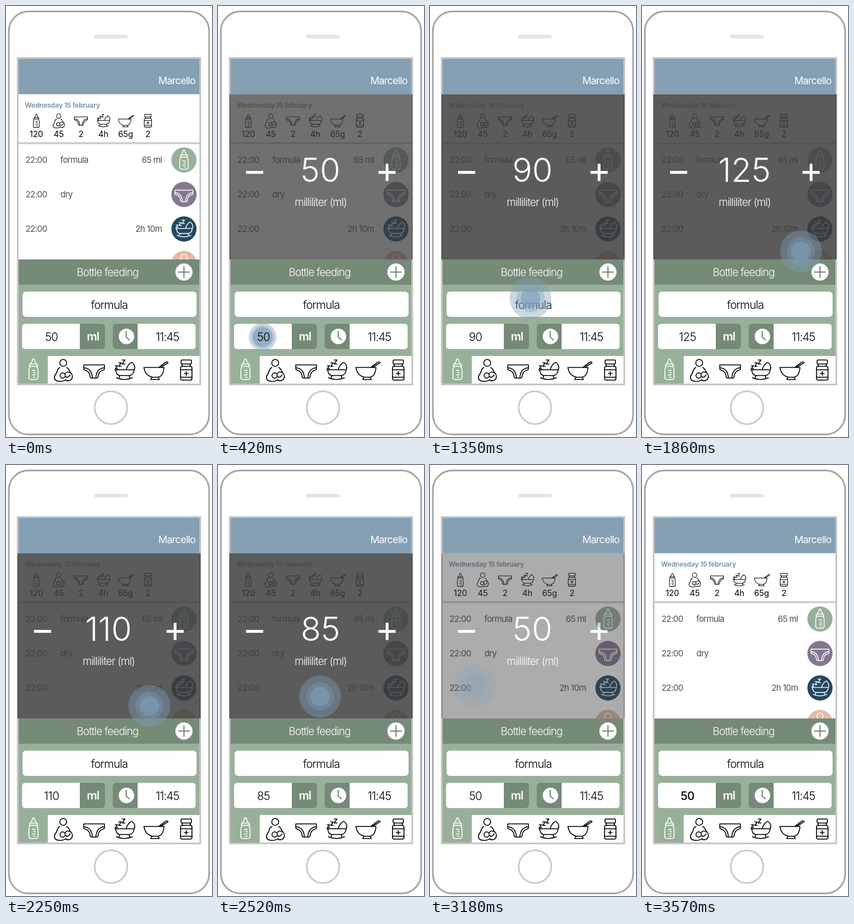
Write an HTML page that moves like this. It is 360 px wide and 750 px high and loops after 4500 ms.

```html
<!DOCTYPE html>
<html lang="en">
<head>
<meta charset="utf-8">
<title>Feeding amount slider</title>
<style>
  html, body { margin: 0; width: 100%; height: 100%; overflow: hidden; background: #fff; }
  svg { display: block; width: 100%; height: 100%; }
  text { font-family: Inter, Roboto, "Open Sans", sans-serif; font-weight: 350; letter-spacing: -.045em; }
  .icon { fill: none; stroke-width: 1.6; stroke-linecap: round; stroke-linejoin: round; }
  .mid { text-anchor: middle; }
  .end { text-anchor: end; }
  .white { fill: #fff; }
  .row { font-size: 14.8px; fill: #505050; font-weight: 400; }
  .sum { font-size: 14.5px; font-weight: 400; letter-spacing: -.01em; }
  .field { font-size: 20px; }
  .number { letter-spacing: -.03em; }
  .dark { fill: #768a78; }
</style>
</head>
<body>
<svg viewBox="0 0 360 750">
  <defs>
    <g id="bottle">
      <path d="M-5-9C-5-12-2-12-2-15Q-2-18 0-18T2-15C2-12 5-12 5-9"/>
      <rect x="-7" y="-9" width="14" height="4" rx="2"/>
      <path d="M-6-5C-8-2-8 0-8 3V14Q-8 18-4 18H4Q8 18 8 14V3C8 0 8-2 6-5M-2 2H3M0 6H3M-2 10H3M0 14H3"/>
    </g>
    <g id="mother">
      <circle cy="-13" r="6"/>
      <path d="M-6-5Q-10-3-11 3L-15 10Q-17 18-8 19Q0 20 5 16M6-5Q10-3 12 3Q18 8 15 15Q11 20 4 17"/>
      <circle cx="-1" cy="9" r="4.6"/>
      <path d="M3 6Q8 0 13 5M4 11Q8 14 12 8"/>
    </g>
    <g id="diaper">
      <path d="M-18-11H18V-5Q18-2 16-2Q8 0 7 9Q7 12 4 12H-4Q-7 12-7 9Q-8 0-16-2Q-18-2-18-5Z"/>
      <path d="M-18-6Q-4-5-3 12M18-6Q4-5 3 12"/>
    </g>
    <g id="crib">
      <path d="M-16-8H-12L-16-3H-12M-10-13H-5.500L-10-7H-5.500M-4-18H1L-4-11H1"/>
      <path d="M-17-1H17M-15-1Q-15 8-8 9H9Q16 8 17-1M3-1C5-8 8-12 13-14C18-10 19-5 17-1M-8 9L-10 14M8 9L10 14M-14 13Q0 19 14 13"/>
    </g>
    <g id="bowl">
      <path d="M-20-5H15Q14 11 4 12H-5Q-18 9-20-5ZM-6 12L-8 16H7L5 12M6-5L18-14Q22-16 22-13L9-5"/>
    </g>
    <g id="jar">
      <rect x="-9" y="-18" width="18" height="7" rx="1.5"/>
      <path d="M-7-11V-7M7-11V-7M-10-1H10M-10 12H10M0 2V9M-3.500 5.500H3.500"/>
      <rect x="-10" y="-7" width="20" height="24" rx="3"/>
    </g>
    <linearGradient id="shade" x2="0" y2="1">
      <stop stop-color="#aaa"/><stop offset="1" stop-color="#fff"/>
    </linearGradient>
  </defs>

  <rect width="360" height="750" fill="#fff"/>
  <rect x="5" y="9.500" width="350" height="736" rx="34" fill="#fff" stroke="#a6a6a6" stroke-width="3"/>
  <rect x="154" y="50" width="59" height="6.500" rx="3.200" fill="#e5e5e5"/>
  <circle cx="183.500" cy="699" r="28.500" fill="#fff" stroke="#ccc" stroke-width="3"/>
  <rect x="20.500" y="90.500" width="319" height="568" fill="#fff" stroke="#c6c6c6" stroke-width="3"/>

  <rect x="22" y="92" width="316" height="61.500" fill="#859fb3"/>
  <text class="white end" x="331" y="136" font-size="17.5" style="font-weight:400">Marcello</text>
  <text x="33" y="177" font-size="11.7" fill="#7f9bb1" style="font-weight:700;letter-spacing:-.015em">Wednesday 15 february</text>
  <rect x="22" y="237.500" width="316" height="4" fill="url(#shade)"/>
  <g id="summary"></g>
  <g id="rows"></g>

  <rect x="22" y="441" width="316" height="44" class="dark"/>
  <rect x="22" y="485" width="316" height="124" fill="#98b099"/>
  <rect x="22" y="609" width="316" height="48" fill="#fff"/>
  <rect x="22" y="608" width="51" height="49" fill="#98b099"/>
  <text class="white mid" x="177.500" y="470" font-size="18.6">Bottle feeding</text>
  <circle cx="311" cy="463" r="15" fill="#fff"/>
  <path d="M301 463H321M311 453V473" stroke="#768a78" stroke-width="2"/>
  <rect x="29" y="497" width="304" height="44" rx="6" fill="#fff"/>
  <text class="field mid" x="180.500" y="526.500">formula</text>

  <rect x="28" y="553" width="145" height="44" rx="6" class="dark"/>
  <path d="M129 553H34Q28 553 28 559V591Q28 597 34 597H129Z" fill="#fff"/>
  <text class="field white mid" x="152" y="582" style="font-weight:600">ml</text>

  <rect x="186.500" y="553" width="145" height="44" rx="6" class="dark"/>
  <path d="M230 553H325.500Q331.500 553 331.500 559V591Q331.500 597 325.500 597H230Z" fill="#fff"/>
  <circle cx="210.500" cy="575" r="13.500" fill="#fff"/>
  <path d="M210 565.500V576L216 581.500" fill="none" stroke="#768a78" stroke-width="2"/>
  <text class="field mid" x="282" y="583">11:45</text>
  <g id="tabs"></g>

  <g id="dialog">
    <rect x="20" y="153.500" width="320" height="287.500" fill="#3c3c3c" fill-opacity=".84"/>
    <path d="M49 289.500H79M280.500 289.500H310.500M295.500 274.500V304.500" stroke="#fff" stroke-width="5"/>
    <text id="big" class="white mid" x="179" y="306" font-size="58" style="font-weight:300;letter-spacing:0">50</text>
    <text class="white mid" x="179.500" y="348" font-size="18.5">milliliter (ml)</text>
  </g>
  <g id="touch" fill="#7d9fb9">
    <circle opacity=".4"/><circle opacity=".35"/><circle opacity=".6"/>
  </g>
  <text id="amount" class="field number mid" x="79.500" y="583">50</text>
</svg>
<script>
const LOOP = 4500, STEP = 30;
const $ = id => document.getElementById(id);
const kinds = ['bottle', 'mother', 'diaper', 'crib', 'bowl', 'jar'];

const icon = (kind, x, y, size, color) =>
  `<use href="#${kind}" class="icon" stroke="${color}" transform="translate(${x} ${y}) scale(${size})"/>`;
const label = (text, x, y, cls) => `<text class="${cls}" x="${x}" y="${y}">${text}</text>`;

const totals = ['120', '45', '2', '4h', '65g', '2'];
$('summary').innerHTML = kinds.map((kind, i) => {
  const x = 53 + 39 * i;
  return icon(kind, x, 200, .64, '#000') + label(totals[i], x, 228, 'sum mid');
}).join('');

const entries = [
  ['bottle', '#98b099', 'formula', '65 ml', 267.5, .92],
  ['diaper', '#84778f', 'dry', '', 330, .87],
  ['crib', '#234860', '', '2h 10m', 388, .86],
  ['mother', '#e3baa5', '', '', 449, .9]
];
$('rows').innerHTML = entries.map(([kind, color, name, amount, iconY, size], i) => {
  const y = 268 + 60 * i;
  const texts = i < 3
    ? label('22:00', 34, y + 5, 'row') + label(name, 95, y + 5, 'row') + label(amount, 272.5, y + 5, 'row end')
    : '';
  return texts + `<circle cx="311" cy="${y}" r="22" fill="${color}"/>` + icon(kind, 311, iconY, size, '#fff');
}).join('');

const tabX = [48, 100, 154, 207, 261, 315];
$('tabs').innerHTML = kinds.map((kind, i) =>
  icon(kind, tabX[i], i === 2 ? 635.5 : i ? 634 : 632, 1, i ? '#000' : '#fff')).join('');

const ramp = (t, from, to) => Math.min(1, Math.max(0, (t - from) / (to - from)));

// Ease with flat ends; a and b are the horizontal handle positions.
function ease(x, a, b) {
  let lo = 0, hi = 1;
  for (let i = 0; i < 24; i++) {
    const s = (lo + hi) / 2, r = 1 - s;
    if (3 * r * r * s * a + 3 * r * s * s * b + s * s * s < x) lo = s; else hi = s;
  }
  return x <= 0 ? 0 : x >= 1 ? 1 : lo * lo * (3 - 2 * lo);
}

const rings = $('touch').children;

function draw(t) {
  const out = ease(ramp(t, 870, 1920), .33, .58);
  const back = ease(ramp(t, 1920, 2970), .52, .67);
  const x = 78 + 201 * (out - back);
  const y = 576 - 150 * out + 20 * out * (1 - out) - 42 * back - 8 * back * (1 - back);
  const value = 50 + 5 * (Math.ceil(15 * out) - Math.ceil(15 * back));
  const leave = 1 - ramp(t, 3090, 3270);

  $('amount').textContent = $('big').textContent = value;
  $('amount').style.fontWeight = t >= 3570 ? 450 : 350;
  $('dialog').setAttribute('opacity', ramp(t, 150, 460) * leave);

  const core = 17 * ramp(t, 120, 270), spread = ramp(t, 330, 570);
  [core + 19.5 * spread, core + 7.5 * spread, core].forEach((r, i) => rings[i].setAttribute('r', r));
  $('touch').setAttribute('transform', `translate(${x} ${y})`);
  $('touch').setAttribute('opacity', t < 150 ? 0 : leave);
}

const start = performance.now();
function tick() {
  const t = (performance.now() - start) % LOOP;
  draw(Math.floor(t / STEP) * STEP);
  requestAnimationFrame(tick);
}
tick();
</script>
</body>
</html>
```
